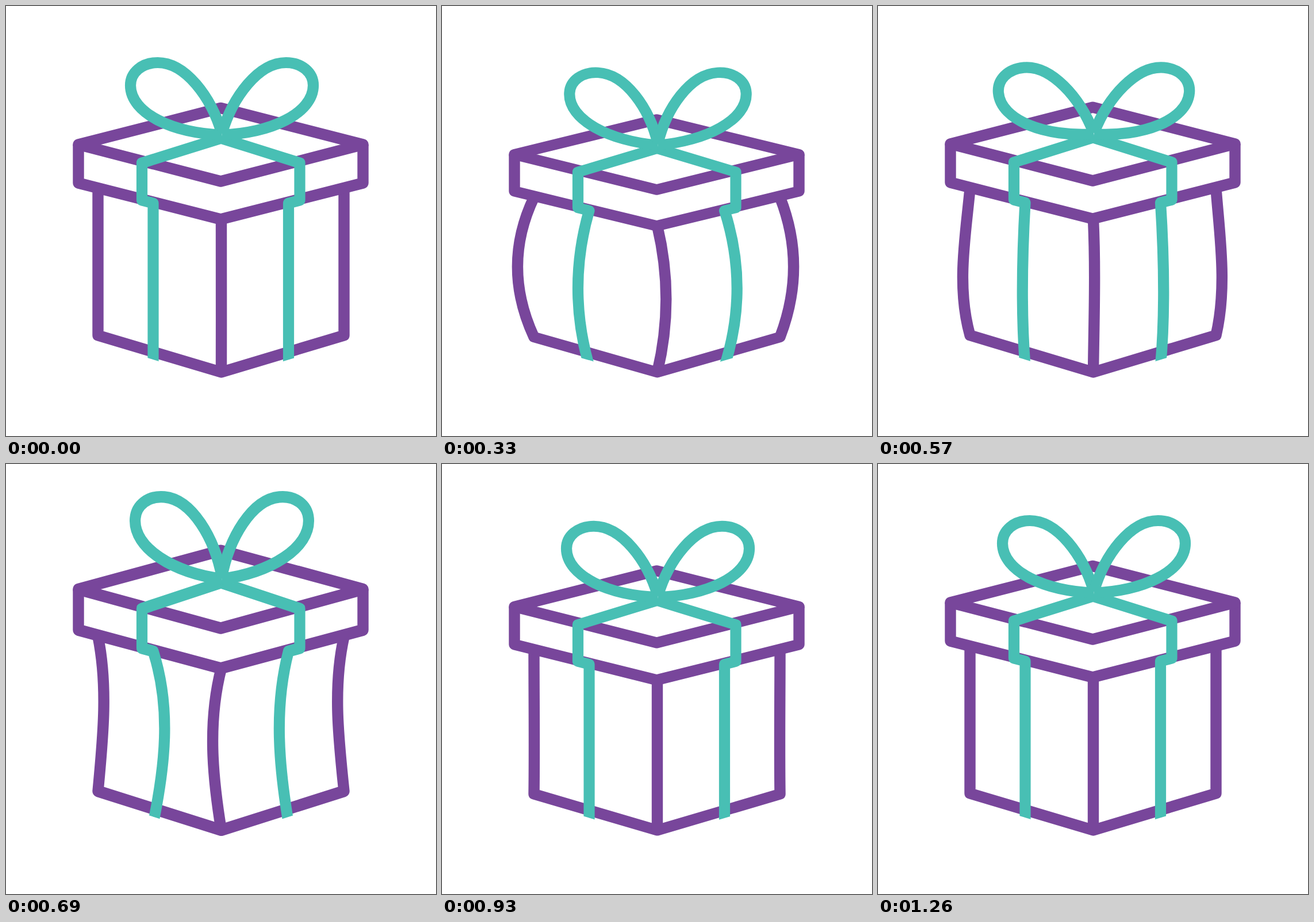
Recreate the animation shown at these times as an HTML page. Size 748 by 748 pixels, loop 3320 ms.

```html
<!DOCTYPE html>
<html lang="en">
<head>
<meta charset="utf-8">
<title>Gift box</title>
<style>
  html, body { margin: 0; width: 100%; height: 100%; overflow: hidden; background: #fff; }
  svg { display: block; width: 100%; height: 100%; }
  path { fill: none; stroke-linejoin: round; }
  .box { stroke: #78469b; stroke-width: 19.4; }
  .ribbon { stroke: #48bfb4; stroke-width: 19.2; }
</style>
</head>
<body>
<svg viewBox="0 0 748 748">
  <defs>
    <clipPath id="cut"><path d="M0 0H748V538.5L374.5 650.5L0 538.5Z"/></clipPath>
    <path id="loop" d="M375.5 222C357 158 312 98.5 264 98.5C236 98.5 216.5 116 216.5 138C216.5 187 292 222 375.5 224"/>
  </defs>
  <g id="gift">
    <g class="box">
      <path id="sides"/>
      <path id="corner"/>
      <path d="M126 241V308L373.5 371L621 308V241"/>
      <path d="M126 241L373.5 177.5L621 241L373.5 305Z"/>
    </g>
    <g class="ribbon">
      <g clip-path="url(#cut)">
        <path id="bandL"/>
        <path id="bandR"/>
      </g>
      <use id="loopL" href="#loop"/>
      <g transform="translate(751 0) scale(-1 1)"><use id="loopR" href="#loop"/></g>
    </g>
  </g>
</svg>
<script>
const LOOP = 3320, STEP = 30, FLOOR = 640;
const $ = id => document.getElementById(id);

// Key poses: bend is 1 when the box bulges, -1 when it is pinched.
const poses = [
  { at: 0,    height: 1,     tilt: 0,  bend: 0 },
  { at: 210,  height: .97,   tilt: 5,  bend: .88 },
  { at: 450,  height: .95,   tilt: 0,  bend: 1 },
  { at: 570,  height: 1.003, tilt: -5, bend: .2 },
  { at: 690,  height: 1.058, tilt: 5,  bend: -1 },
  { at: 930,  height: .982,  tilt: 0,  bend: 0 },
  { at: 1100, height: 1.007, tilt: 0,  bend: 0 },
  { at: 1260, height: 1,     tilt: 0,  bend: 0 }
];

// Sideways pull when bulging and when pinched; lag delays the lower half.
const edges = {
  left:   { x: 160,   top: 319, end: 573, bulge: -40, pinch: 18,  lag: 45 },
  right:  { x: 588,   top: 319, end: 573, bulge: 33,  pinch: -20, lag: 45 },
  corner: { x: 374.5, top: 371, end: 637, bulge: 21,  pinch: -24, lag: -15 },
  bandL:  { x: 256,   top: 343, end: 626, bulge: -27, pinch: 32,  lag: 10 },
  bandR:  { x: 491.5, top: 343, end: 626, bulge: 30,  pinch: -26, lag: 10 }
};

// Smooth curve through the poses that never overshoots them.
function slope(key, i) {
  const [p, q, r] = [poses[i - 1], poses[i], poses[i + 1]];
  if (!p || !r) return 0;
  const a = (q[key] - p[key]) / (q.at - p.at);
  const b = (r[key] - q[key]) / (r.at - q.at);
  return a * b > 0 ? 2 * a * b / (a + b) : 0;
}

function sample(key, time) {
  const t = Math.max(time, 0);
  const i = poses.findIndex(p => p.at > t) - 1;
  if (i < 0) return poses.at(-1)[key];
  const p = poses[i], q = poses[i + 1], d = q.at - p.at;
  const u = (t - p.at) / d, w = 1 - u;
  return p[key] * w * w * (1 + 2 * u) + q[key] * u * u * (3 - 2 * u)
    + d * u * w * (slope(key, i) * w - slope(key, i + 1) * u);
}

// Bent edge as a curve that continues the current path, down or up.
function curve({ x, top, end, bulge, pinch, lag }, t, up) {
  const pull = bend => x + (bend > 0 ? bulge : -pinch) * bend;
  const low = sample("bend", t - lag), third = (end - top) / 3;
  const points = [
    [x, top],
    [pull(sample("bend", t)), top + third],
    [pull(low < 0 ? low * .65 : low), end - third],
    [x, end]
  ];
  if (up) points.reverse();
  return "C" + points.slice(1).join(" ");
}

function draw(t) {
  const h = sample("height", t), turn = `rotate(${sample("tilt", t)} 375.5 226)`;
  const path = (id, d) => $(id).setAttribute("d", d);

  $("gift").setAttribute("transform", `translate(0 ${FLOOR * (1 - h)}) scale(1 ${h})`);
  path("sides", "M160 319" + curve(edges.left, t) + "L374.5 637L588 573" + curve(edges.right, t, true));
  path("corner", "M374.5 371" + curve(edges.corner, t));
  path("bandL", "M374 230L236.5 273V338L256 343" + curve(edges.bandL, t));
  path("bandR", "M374 230L511 273V338L491.5 343" + curve(edges.bandR, t));
  for (const id of ["loopL", "loopR"]) $(id).setAttribute("transform", turn);
}

const start = performance.now();
function tick() {
  const t = (performance.now() - start) % LOOP;
  draw(Math.floor(t / STEP) * STEP);
  requestAnimationFrame(tick);
}
tick();
</script>
</body>
</html>
```
